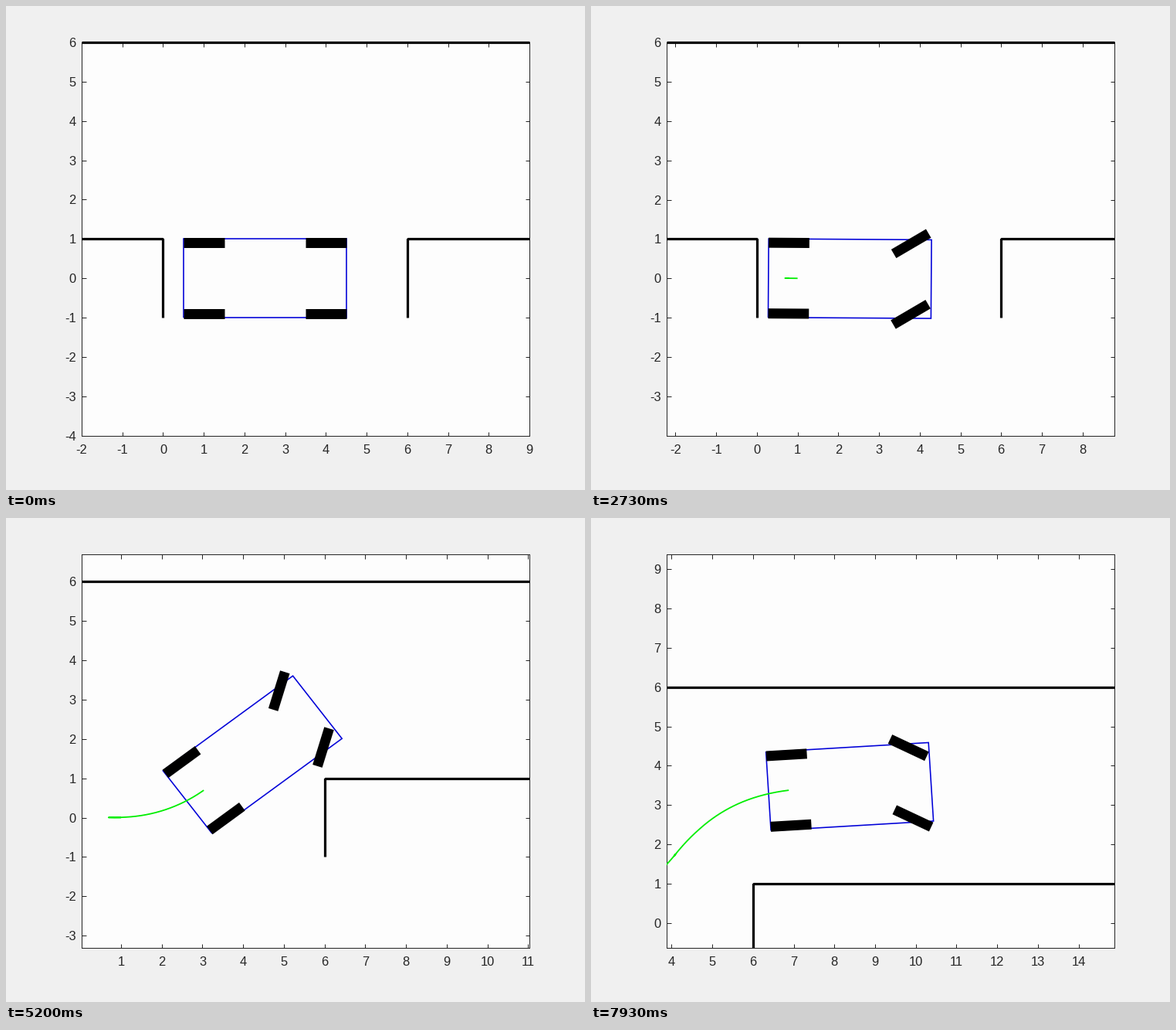
Recreate the animation shown at these times as a matplotlib script. Size 750x626 px, loop 8000 ms.

```python
import numpy as np
import matplotlib.pyplot as plt
from matplotlib.animation import FuncAnimation
from matplotlib.ticker import MultipleLocator

W, H, DPI = 750, 626, 100
FRAMES, SUB = 80, 20
WHEELBASE, TRACK = 3.0, 0.9
INK = "#262626"

plt.rcParams["font.family"] = "Liberation Sans"
plt.rcParams["axes.unicode_minus"] = False


def px(n):
    """Pixels to points."""
    return n * 72 / DPI


def speed_at(t):
    """Full throttle or full brake: slow playback up to t=51, then faster."""
    slow = np.interp(t, [0, 10.3, 20.7, 51], [0, -0.03, 0, 0.138])
    fast = np.interp(t, [51, 60, 61.6, 80], [0.43, 0, -0.076, 0.494])
    return np.where(t < 51, slow, fast)


def steer_at(t):
    """Lock to lock at a constant rate, in radians."""
    rate, lock = 3.77, 40
    left = np.minimum(1.17 * t, lock)
    right = np.clip(rate * (t - 51), 0, 2 * lock)
    back = rate * np.maximum(t - 76.2, 0)
    return np.radians(left - right + back)


# Points the path passes: step, x, y, heading in degrees.
VIA = np.array([(0, 1, 0, 0), (18, 0.703, 0.004, -1.25), (34, 1.098, 0.012, 4.0),
                (52, 3.032, 0.697, 37.1), (60, 4.101, 1.75, 51.2),
                (72, 4.663, 2.366, 41.2), (79, 6.88, 3.376, 3.5)])


def drive():
    """Bicycle model, nudged along the travelled distance to pass the points."""
    mid = (np.arange((FRAMES - 1) * SUB) + 0.5) / SUB
    ds = speed_at(mid) / SUB
    turn = ds * np.tan(steer_at(mid)) / WHEELBASE
    heading = np.cumsum(turn) - turn / 2

    def total(step, start=0.0):
        return np.concatenate([[start], start + np.cumsum(step)])

    pose = np.column_stack([total(ds * np.cos(heading), 1.0),
                            total(ds * np.sin(heading)), total(turn)])
    dist = total(np.abs(ds))
    at = VIA[:, 0].astype(int) * SUB
    gap = VIA[:, 1:] * [1, 1, np.pi / 180] - pose[at]
    for i in range(3):
        pose[:, i] += np.interp(dist, dist[at], gap[:, i])
    return pose


POSE = drive()

fig = plt.figure(figsize=(W / DPI, H / DPI), dpi=DPI, facecolor="#f0f0f0")
ax = fig.add_axes([98 / W, 1 - 555.5 / H, 580 / W, 508.5 / H], facecolor="#fdfdfd")
for axis in (ax.xaxis, ax.yaxis):
    axis.set_major_locator(MultipleLocator(1))
ax.tick_params(direction="in", top=True, right=True, length=px(5.5), width=px(1),
               color=INK, labelcolor=INK, labelsize=px(16.5))
ax.tick_params(axis="x", pad=px(11.5))
ax.tick_params(axis="y", pad=px(7.3))
for spine in ax.spines.values():
    spine.set(linewidth=px(1), color=INK)
fig.add_artist(plt.Line2D([0, 1], [0.5 / H] * 2, color="black", lw=px(1)))


def line(color, width, xs=(), ys=(), **kw):
    return ax.plot(xs, ys, color=color, lw=px(width), solid_capstyle="butt", **kw)[0]


wall = dict(solid_joinstyle="bevel", zorder=3)
line("black", 3.2, [-50, 0, 0], [1, 1, -1], **wall)
line("black", 3.2, [50, 6, 6], [1, 1, -1], **wall)
top_wall = line("black", 3.2, clip_on=False, **wall)
body = line("#0000d8", 1.6, solid_joinstyle="miter", zorder=4)
trail = line("#00ee00", 1.8, zorder=5)
wheels = [line("black", 13, zorder=6) for _ in range(4)]
MOUNTS = [(x, y) for x in (0, WHEELBASE) for y in (TRACK, -TRACK)]
BODY = np.array([(-0.5, -1), (3.5, -1), (3.5, 1), (-0.5, 1), (-0.5, -1)])


def rotate(points, a):
    c, s = np.cos(a), np.sin(a)
    return np.asarray(points) @ np.array([[c, s], [-s, c]])


def draw(k):
    x, y, heading = POSE[k * SUB]
    pos = np.array([x, y])
    ax.set_xlim(x - 3, x + 8)
    ax.set_ylim(y - 4, y + 6)
    top_wall.set_data([x - 3, x + 8], [6, 6])
    body.set_data(*(rotate(BODY, heading) + pos).T)
    trail.set_data(*POSE[:k * SUB + 1, :2].T)
    for wheel, mount in zip(wheels, MOUNTS):
        angle = heading + (steer_at(k) if mount[0] else 0)
        ends = rotate([(-0.5, 0), (0.5, 0)], angle) + rotate(mount, heading) + pos
        wheel.set_data(*ends.T)
    return [top_wall, body, trail, *wheels]


anim = FuncAnimation(fig, draw, frames=FRAMES, interval=100, repeat=True,
                     repeat_delay=0, blit=False)
plt.show()
```
